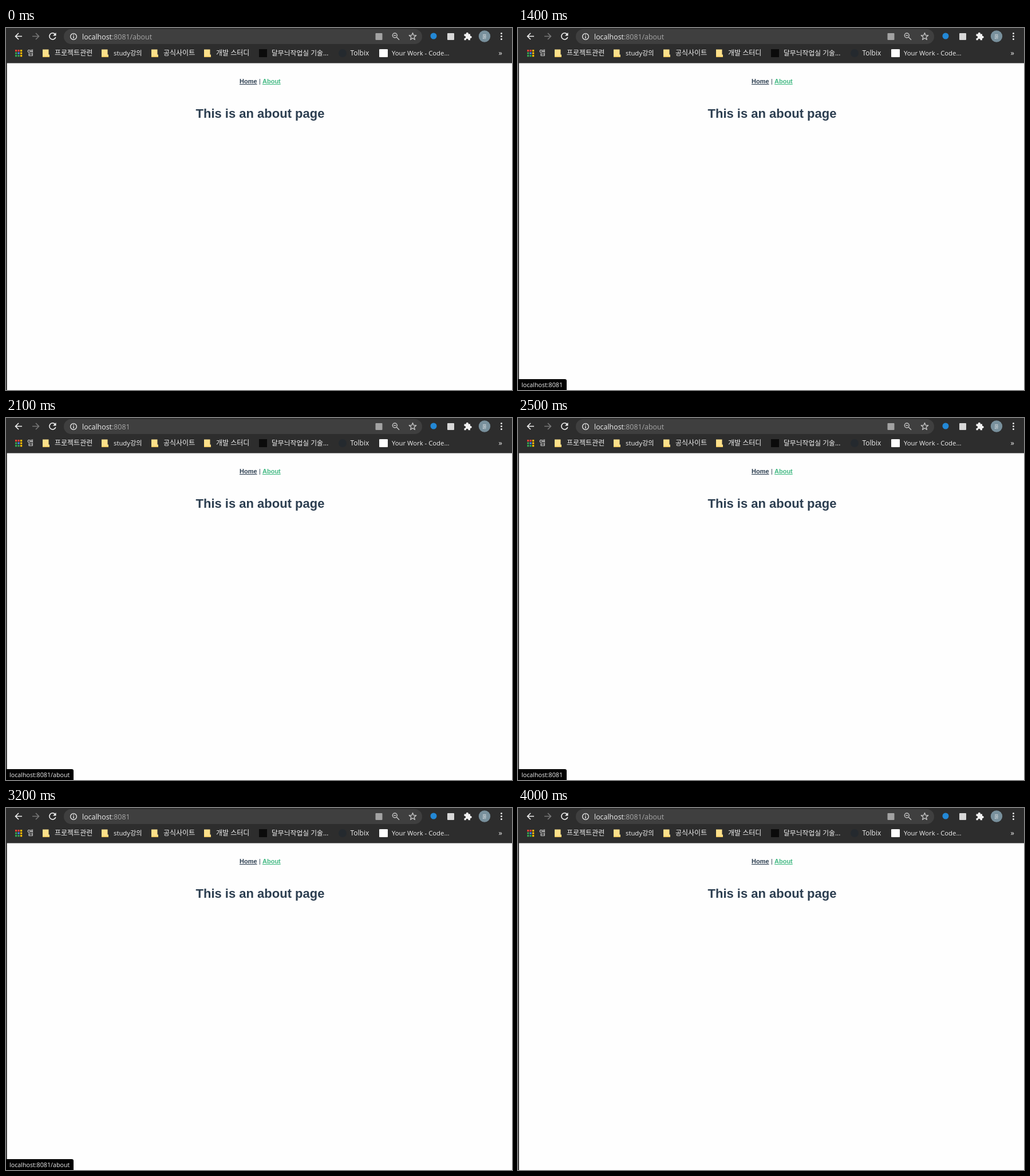
An HTML page that plays this animation: 884x633 px, repeating every 4200 ms.

```html
<!DOCTYPE html>
<html lang="ko">
<head>
<meta charset="utf-8">
<title>About page</title>
<style>
html, body { margin: 0; width: 100%; height: 100%; overflow: hidden; background: #fefefe; }
svg { display: block; }
text { white-space: pre; }
.ui { font-family: "Open Sans", "Noto Sans CJK KR", "Noto Sans CJK", sans-serif; fill: #f1f1f1; }
.page { font-family: "Liberation Sans", Arial, sans-serif; font-size: 11px; fill: #2c3e50; }
.bold { font-weight: bold; }
.link { fill: #42b983; }
.link, .under { text-decoration: underline; text-decoration-thickness: 1px; text-underline-offset: 1px; }
</style>
</head>
<body>
<svg id="stage" width="884" height="633" viewBox="0 0 884 633">
  <rect width="884" height="633" fill="#fefefe"/>
  <rect y="61" width="1.6" height="572" fill="#151515"/>

  <g id="bar">
    <rect width="884" height="61.5" fill="#2d2d2d"/>
    <rect x="101" y="2" width="626" height="26" rx="13" fill="#3f3f3f"/>
    <g fill="none" stroke="#f1f1f1" stroke-width="1.6">
      <path d="M28 14.5H17M22 9l-5.5 5.5L22 20"/>
      <path d="M46 14.5h11M52 9l5.5 5.5L52 20" stroke="#777"/>
      <path d="M85.6 10.6A5.6 5.6 0 1 0 86.8 16"/>
      <circle cx="118" cy="15" r="5.4" stroke-width="1.3"/>
      <path d="M118 14.2v4M118 11.4v1.5" stroke-width="1.4"/>
      <g stroke="#c6c6c6" stroke-width="1.4">
        <circle cx="679.3" cy="13" r="4"/>
        <path d="M682.3 16l4.7 4.7M677.3 13h4"/>
        <path id="star" stroke-width="1.3" stroke-linejoin="round"/>
      </g>
    </g>
    <path d="M87.5 8v5.5H82z" fill="#f1f1f1"/>
    <rect x="645.5" y="9" width="12" height="12" rx="1" fill="#a3a3a3"/>
    <circle cx="747" cy="14" r="5.5" fill="#2388d6"/>
    <rect x="771" y="9" width="12" height="12" rx="1" fill="#d8d8d8"/>
    <path d="M800.5 10.5h3.3a2.1 2.1 0 1 1 4 0h3.2v3.4a2.1 2.1 0 1 1 0 4v3.4h-3.5a2 2 0 1 0-3.8 0h-3.2v-3.5a2 2 0 1 0 0-3.8z" fill="#f1f1f1"/>
    <circle cx="836" cy="14.5" r="10.2" fill="#78909c"/>
    <text class="ui" x="836" y="17.6" font-size="8.5" text-anchor="middle">윤</text>
    <g fill="#f1f1f1">
      <circle cx="865.5" cy="9.5" r="1.5"/><circle cx="865.5" cy="14.5" r="1.5"/><circle cx="865.5" cy="19.5" r="1.5"/>
    </g>
    <text class="ui" x="133" y="19.6" font-size="12.4">localhost<tspan fill="#a8a8a8">:8081<tspan id="path">/about</tspan></tspan></text>
    <rect x="442" y="37" width="14" height="14" fill="#0b0b0b"/>
    <circle cx="588" cy="44" r="7" fill="#24292e"/>
    <rect x="652" y="37" width="15" height="14" rx="1" fill="#fff"/>
    <text class="ui" x="860.5" y="47.5" font-size="13">»</text>
  </g>

  <g id="nav" class="page bold">
    <text id="navHome" class="under" x="408" y="97">Home</text>
    <text x="442" y="97" font-weight="normal">|</text>
    <text id="navAbout" class="under" x="448" y="97">About</text>
  </g>
  <g id="about" class="page"></g>
  <g id="home" class="page">
    <circle cx="444" cy="190.5" r="59.5" fill="#42b883"/>
  </g>

  <g id="status">
    <path id="bubble" fill="#000"/>
    <text class="ui" x="6" y="628" font-size="10.7">localhost:8081<tspan id="hint">/about</tspan></text>
  </g>
</svg>
<script>
const LOOP = 4200;
const $ = id => document.getElementById(id);

function add(parent, tag, attrs, text) {
  const el = document.createElementNS("http://www.w3.org/2000/svg", tag);
  for (const k in attrs) el.setAttribute(k, attrs[k]);
  if (text) el.textContent = text;
  $(parent).appendChild(el);
  return el;
}

function starPath(cx, cy, outer, inner) {
  const pts = [];
  for (let i = 0; i < 10; i++) {
    const a = i * Math.PI / 5 - Math.PI / 2, r = i % 2 ? inner : outer;
    pts.push((cx + r * Math.cos(a)).toFixed(2) + " " + (cy + r * Math.sin(a)).toFixed(2));
  }
  return "M" + pts.join("L") + "z";
}

function buildBar() {
  $("star").setAttribute("d", starPath(710.5, 15, 6.6, 2.8));

  const red = "#ea4335", yellow = "#fbbc04", green = "#34a853", blue = "#4285f4";
  [red, red, yellow, green, blue, yellow, green, green, yellow].forEach((fill, i) =>
    add("bar", "rect", { x: 16 + i % 3 * 4.5, y: 38 + Math.floor(i / 3) * 4.5, width: 3.2, height: 3.2, fill }));

  for (const x of [64, 167, 254, 346]) {
    add("bar", "path", { d: `M${x} 37.5h10.5v9h1.5v4.5h-12z`, fill: "#fde08a" });
    add("bar", "path", { d: `M${x} 49.5h12v1.5h-12z`, fill: "#efc659" });
  }

  const marks = [
    [37, "앱", 12], [85, "프로젝트관련", 12], [188, "study강의", 11.3],
    [275, "공식사이트", 12], [367, "개발 스터디", 12], [464, "달무늬작업실 기술...", 11.8],
    [601.5, "Tolbix", 12], [674, "Your Work - Code...", 11.3]
  ];
  for (const [x, label, size] of marks)
    add("bar", "text", { class: "ui", x, y: 47.8, "font-size": size }, label);
}

function heading(parent, y, size, label) {
  add(parent, "text", { class: "bold", x: 444, y, "font-size": size, "text-anchor": "middle" }, label)
    .style.fontSize = size + "px";
}

function links(y, items) {
  for (const [x, label] of items) add("home", "text", { class: "link", x, y }, label);
}

function buildPages() {
  heading("about", 156.5, 22, "This is an about page");
  heading("home", 297.5, 22, "Welcome to Your Vue.js App");
  add("home", "text", { x: 444, y: 328, "text-anchor": "middle" },
    "For a guide and recipes on how to configure / customize this project,");
  add("home", "text", { x: 354, y: 341 }, "check out the ");
  links(341, [[422.6, "vue-cli documentation"]]);
  add("home", "text", { x: 530.5, y: 341 }, ".");
  heading("home", 383, 12.87, "Installed CLI Plugins");
  links(407, [[344.2, "babel"], [385, "router"], [428, "vuex"], [465, "eslint"], [505, "unit-jest"]]);
  heading("home", 449, 12.87, "Essential Links");
  links(473, [[303, "Core Docs"], [369, "Forum"], [415, "Community Chat"], [511, "Chirrel"], [557, "News"]]);
  heading("home", 515.5, 12.87, "Ecosystem");
  links(539, [[287.5, "vue-router"], [352, "vuex"], [389, "vue-devtools"], [465.3, "vue-loader"], [531.5, "awesome-vue"]]);
}

// Value of the last [time, value] step that has started.
function at(steps, t) {
  let value = steps[0][1];
  for (const [start, v] of steps) if (t >= start) value = v;
  return value;
}

const onHome = [[0, 0], [1500, 1], [2100, 0], [2700, 1], [3200, 0]];
const homeUrl = [[0, 0], [1600, 1], [2200, 0], [2700, 1], [3300, 0]];
const longHint = [[0, 0], [1800, 1], [2500, 0], [2900, 1]];
const hintAlpha = [[0, 0], [1200, 0.35], [1300, 0.75], [1400, 1], [3600, 0.5], [3700, 0]];

const show = (id, on) => $(id).setAttribute("display", on ? "inline" : "none");

function draw(t) {
  const home = at(onHome, t), long = at(longHint, t);
  show("home", home);
  show("about", !home);
  $("navHome").setAttribute("class", home ? "link" : "under");
  $("navAbout").setAttribute("class", home ? "under" : "link");
  show("path", !at(homeUrl, t));
  show("hint", long);
  $("bubble").setAttribute("d", `M0 614H${long ? 115 : 82}q3 0 3 3V633H0z`);
  $("status").setAttribute("opacity", at(hintAlpha, t));
}

function tick() {
  draw(performance.now() % LOOP);
  requestAnimationFrame(tick);
}

buildBar();
buildPages();
tick();
</script>
</body>
</html>
```
